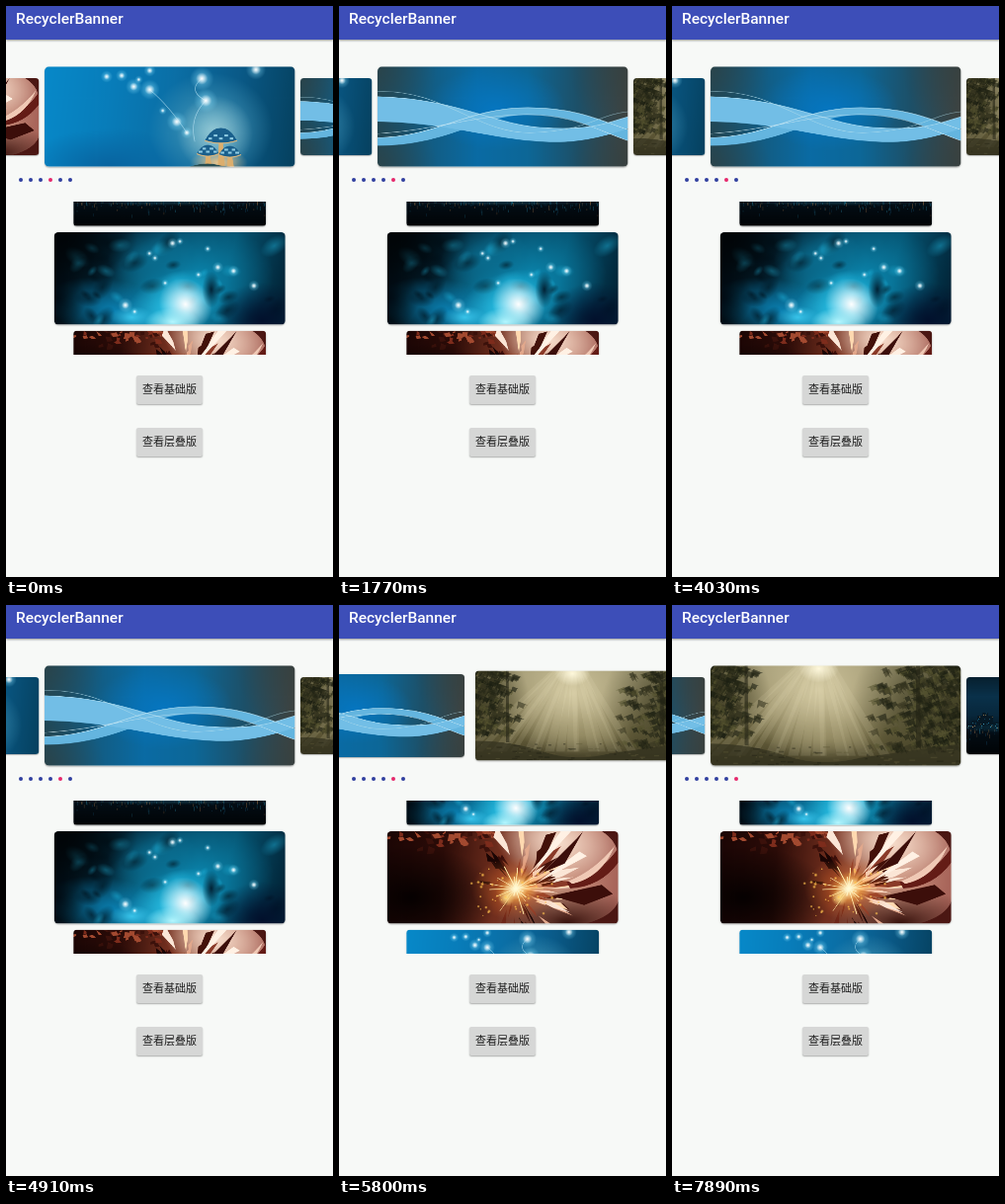
Recreate the animation shown at these times as an HTML page with a canvas. Size 331 px wide and 578 px high, loop 8000 ms.

```html
<!DOCTYPE html>
<html lang="zh">
<head>
<meta charset="utf-8">
<title>RecyclerBanner</title>
<style>
  html, body { margin: 0; width: 100%; height: 100%; overflow: hidden; background: #f7f9f7; }
  #stage { position: absolute; left: 0; top: 0; width: 331px; height: 578px; overflow: hidden; }
  header {
    position: absolute; left: 0; top: 0; width: 331px; height: 34px; background: #3d4eb8;
    box-shadow: 0 1px 2px rgba(0, 0, 0, .4);
    font: 500 15.5px/26px Roboto, sans-serif; color: #fff; text-indent: 10px;
  }
  .carousel { position: absolute; left: 0; width: 331px; overflow: hidden; }
  #across { top: 55px; height: 114px; }
  #down { top: 197.5px; height: 155px; }
  .card {
    position: absolute; left: 0; top: 0; width: 194.6px; height: 78px;
    border-radius: 3.5px; box-shadow: 0 .7px 1.2px rgba(0, 0, 0, .35);
  }
  .dot { position: absolute; top: 174.2px; width: 4px; height: 4px; border-radius: 50%; }
  .button {
    position: absolute; left: 132px; width: 67px; height: 29px; background: #d6d7d6;
    border-radius: 2px; box-shadow: 0 1px 1.5px rgba(0, 0, 0, .3);
    font: 11px/26px "Noto Sans CJK SC", "Noto Sans CJK", sans-serif; color: #1d1d1d;
    text-align: center; white-space: nowrap;
  }
</style>
</head>
<body>
<div id="stage">
  <div id="across" class="carousel"></div>
  <div id="down" class="carousel"></div>
  <header>RecyclerBanner</header>
  <div class="button" style="top:373.5px">查看基础版</div>
  <div class="button" style="top:426.5px">查看层叠版</div>
</div>
<script>
const LOOP = 8000, CARD_W = 194.6, CARD_H = 78, COUNT = 6;
const stage = document.getElementById('stage');

function seeded(seed) {
  return (lo = 0, hi = 1) => {
    seed = (seed * 16807) % 2147483647;
    return lo + (hi - lo) * seed / 2147483647;
  };
}

// Painting helpers; every picture is 250 x 100 units.
function linear(g, x1, y1, x2, y2, colors) {
  const fill = g.createLinearGradient(x1, y1, x2, y2);
  colors.forEach((c, i) => fill.addColorStop(i / (colors.length - 1), c));
  g.fillStyle = fill;
  g.fillRect(0, 0, 250, 100);
}

function glow(g, x, y, r, color, squash = 1, tilt = 0) {
  g.save();
  g.translate(x, y);
  g.rotate(tilt);
  g.scale(1, squash);
  const fill = g.createRadialGradient(0, 0, 0, 0, 0, r);
  fill.addColorStop(0, color);
  fill.addColorStop(1, color.slice(0, 7) + '00');
  g.fillStyle = fill;
  g.fillRect(-r, -r, 2 * r, 2 * r);
  g.restore();
}

function star(g, x, y, r) {
  glow(g, x, y, r * 2, '#8fe4ff99');
  glow(g, x, y, r, '#ffffff');
}

function shape(g, path, color) {
  g.fillStyle = color;
  g.fill(new Path2D(path));
}

function stroke(g, path, color, width) {
  g.strokeStyle = color;
  g.lineWidth = width;
  g.stroke(new Path2D(path));
}

function city(g) {
  const rnd = seeded(41);
  linear(g, 0, 0, 0, 100, ['#07202f', '#0a314a', '#08273b', '#030c13', '#010406']);
  for (let x = 0; x < 250; x += 7) {
    const h = rnd(3, 20);
    g.fillStyle = '#061824';
    g.fillRect(x, 66 - h, 7, h);
    for (let i = 0; i < 6; i++) {
      g.fillStyle = ['#46b4d4', '#c09a60', '#1f7fa8'][i % 3];
      g.fillRect(x + rnd(0, 6), 66 - rnd(0, h), 1, 1);
    }
  }
  glow(g, 125, 66, 130, '#2d9bbc66', .06);
  for (let i = 0; i < 150; i++) {
    g.fillStyle = ['#2b87a455', '#b4814e55', '#164e7055'][i % 3];
    g.fillRect(rnd(0, 250), 67 + 24 * rnd() * rnd(), 1, rnd(1, 6));
  }
}

function nebula(g) {
  const rnd = seeded(17);
  linear(g, 0, 0, 250, 60, ['#01060a', '#03202f', '#07506e', '#065573', '#022538']);
  glow(g, 140, 62, 100, '#0c93bd', .65, -.3);
  glow(g, 65, 85, 75, '#0a7fb0', .45, .2);
  glow(g, 108, 30, 50, '#0a6c8e', .7);
  for (let i = 0; i < 44; i++) {
    glow(g, rnd(25, 240), rnd(5, 98), rnd(6, 17), i % 2 ? '#01131e99' : '#1fb4dc77', .6, rnd(-1, 1));
  }
  glow(g, 10, 5, 80, '#010508', .7);
  glow(g, 0, 70, 35, '#010a12', 1);
  glow(g, 130, 80, 58, '#2cc6ea', .62, -.4);
  glow(g, 142, 78, 30, '#ffffff', .9, .7);
  glow(g, 128, 97, 30, '#b4f7ff', .5);
  glow(g, 84, 92, 24, '#39c4ea', .5);
  glow(g, 170, 62, 10, '#022235', 2);
  glow(g, 225, 96, 52, '#02102c', .8);
  [[128, 12, 3], [136, 10, 2], [103, 23, 2], [109, 28, 2], [77, 79, 4], [177, 38, 3],
   [194, 42, 3], [216, 58, 3], [166, 18, 2], [87, 86, 2], [156, 46, 2], [120, 55, 2]]
    .forEach(s => star(g, ...s));
}

function explosion(g) {
  const rnd = seeded(29), cx = 139, cy = 62;
  linear(g, 0, 0, 250, 20, ['#1c0605', '#2c0c08', '#74301f', '#d09a84', '#a8655a']);
  glow(g, 185, 12, 70, '#f6dccb', .6, .2);
  glow(g, 195, 100, 80, '#350f0a', .5);
  for (let i = 0; i < 40; i++) {
    const size = rnd(3, 9);
    shape(g, `M${rnd(0, 115)} ${30 * rnd() * rnd()}l${size} ${rnd(-3, 3)} ${rnd(-2, 5)} ${size * .7} ${-size} 1Z`,
      ['#7d2c1c', '#3b110b', '#a34a30'][i % 3]);
  }
  const dark = ['#3a0e09', '#1a0504', '#6d2618'], light = ['#fbe6d6', '#e2a88c', '#431109', '#ffd9b0', '#8a3a28'];
  for (let i = 0; i < 70; i++) {
    const a = rnd(-1, 1) * rnd(.4, 3.1) - .4, near = rnd(5, 45), far = near + rnd(10, 55), w = rnd(.02, .12);
    const at = (angle, d) => `${cx + Math.cos(angle) * d},${cy + Math.sin(angle) * d * .85}`;
    const tones = Math.cos(a + .4) > .1 ? light : dark;
    shape(g, `M${at(a + w, near)}L${at(a - w, far * rnd(.6, 1))}L${at(a, far)}L${at(a + w * .8, far * .7)}Z`, tones[i % tones.length]);
  }
  glow(g, 25, 72, 95, '#060101', .6);
  shape(g, 'M158 45L182 8 188 0H199ZM160 57L208 22 216 27Z', '#fff1e4');
  shape(g, 'M168 45L205 8 212 0 192 35ZM178 70L232 58 244 68 213 80Z', '#3c0e0a');
  shape(g, 'M194 55Q229 49 250 18V34Q231 60 198 62Z', '#641c16');
  shape(g, 'M196 54Q224 43 246 16Q232 50 200 57Z', '#f0c9b5');
  shape(g, 'M232 0Q248 10 250 26V0ZM215 100Q244 92 250 76V100Z', '#4b1713');
  glow(g, cx, cy, 48, '#e8702899', .72);
  glow(g, cx + 2, cy, 24, '#ffb84a', .8, -.4);
  for (let i = 0; i < 18; i++) {
    const a = i * 2.4, d = rnd(8, 30);
    stroke(g, `M${cx} ${cy}l${Math.cos(a) * d} ${Math.sin(a) * d}`, '#ffe6a5', rnd(.5, 1.4));
  }
  glow(g, cx, cy, 15, '#fffbd8', .8, -.5);
  glow(g, cx - 10, cy + 10, 9, '#ffe08a');
  for (let i = 0; i < 45; i++) glow(g, cx + rnd(-48, 40), cy + rnd(-22, 30), rnd(.8, 2.2), '#ffc14d');
}

function mushrooms(g) {
  linear(g, 0, 35, 250, 65, ['#0788c8', '#087dba', '#0b6fa6', '#0a5a88', '#064261']);
  glow(g, 65, 100, 85, '#0864a0', .45);
  glow(g, 166, 62, 62, '#4c9fbe', .9);
  glow(g, 170, 67, 38, '#a9d5dccc', 1);
  stroke(g, 'M105 23Q125 40 142 66M157 12Q142 24 161 34Q144 51 150 75', '#cff2ff88', .8);
  [[62, 10, 3], [77, 9, 3], [94, 13, 2], [89, 20, 4], [105, 4, 3], [105, 23, 5], [157, 12, 6],
   [161, 34, 6], [132, 55, 5], [142, 66, 3], [211, 3, 5], [118, 44, 2]].forEach(s => star(g, ...s));
  glow(g, 174, 96, 29, '#efc68a', .45);
  for (const [x, y, w] of [[176, 74, 16], [163, 87, 11], [185, 88, 11]]) {
    shape(g, `M${x - 2} ${y}L${x - 3} 100H${x + 4}L${x + 2} ${y}Z`, '#dcae6d');
    shape(g, `M${x - w} ${y}Q${x - w * .6} ${y - w * .8} ${x} ${y - w * .8}T${x + w} ${y}Q${x} ${y + 5} ${x - w} ${y}Z`, '#195f8c');
    for (let i = -2; i < 3; i++) {
      shape(g, `M${x + i * w / 3 - 1.8} ${y - 3 - (i % 2 ? 3 : 0)}h3.6v2h-3.6Z`, '#8fcce3');
    }
    stroke(g, `M${x - w} ${y}Q${x} ${y + 5} ${x + w} ${y}`, '#e0b97e', 1);
  }
  shape(g, 'M145 100Q160 95 172 98T204 100Z', '#264c50');
}

function waves(g) {
  linear(g, 0, 0, 250, 0, ['#1d4a5c', '#135c82', '#0a6ba4', '#0d6797', '#1d5068', '#404340']);
  glow(g, 118, 42, 70, '#0676c0', .6);
  for (const [x, y] of [[0, 0], [0, 100], [250, 0], [250, 100]]) glow(g, x, y, 60, '#34403f99');
  const lower = 'M0 71C60 70 90 41 150 41C200 41 225 55 250 63';
  const upper = 'M0 30C80 32 115 58 165 61S230 56 250 50';
  shape(g, lower + 'V74C220 64 195 47 150 48C100 49 70 79 0 79Z', '#64b5df');
  shape(g, upper + 'V62C220 72 195 77 165 75C110 72 70 56 0 55Z', '#72bee6');
  stroke(g, lower, '#c0e5f3', .6);
  stroke(g, upper, '#a9daf0', .6);
  stroke(g, 'M0 25C65 22 100 68 155 66S220 48 250 45', '#b5e0eeaa', .6);
  stroke(g, 'M0 67C60 63 95 49 145 48S220 64 250 74', '#d7eff6aa', .6);
}

function forest(g) {
  const rnd = seeded(73);
  linear(g, 0, 0, 0, 100, ['#a09873', '#948b65', '#807751', '#615a38', '#3f3b24']);
  glow(g, 108, 25, 85, '#cfc59d', .8);
  glow(g, 0, 30, 60, '#3a3820', 1);
  glow(g, 230, 40, 90, '#3d3c24', .9);
  for (let i = 0; i < 16; i++) {
    const x = -10 + i * 12 + rnd(-4, 4), w = rnd(5, 13);
    shape(g, `M106 -20L${x} 90H${x + w}L112 -20Z`, '#f0e8c41c');
  }
  // Foliage thickens towards both edges.
  const leaves = (edge, dir, reach, height, count) => {
    for (let i = 0; i < count; i++) {
      const y = rnd(-4, height), limit = reach * (.72 + .28 * Math.sin(y * .42));
      const x = edge + dir * limit * rnd() ** 1.3, w = rnd(4, 11);
      shape(g, `M${x} ${y}l${dir * w} ${w * .4} ${-dir * w * .3} 0 ${-dir * 2} 4 ${-dir * w * .4} -2 ${-dir * 3} 3Z`,
        ['#25261599', '#38372199', '#1d1f1299', '#55522f88'][i % 4]);
    }
  };
  leaves(-4, 1, 52, 68, 260);
  leaves(254, -1, 96, 82, 520);
  shape(g, 'M34 0h3l1 80h-4ZM205 0h4l1 82h-5Z', '#26261699');
  glow(g, 108, 3, 20, '#fff9dd', .7);
  glow(g, 118, 72, 60, '#b5aa7c55', .45);
  shape(g, 'M0 78Q40 78 75 90T150 92L250 78V100H0Z', '#33321ebb');
  for (let i = 0; i < 80; i++) {
    g.fillStyle = i % 2 ? '#5e593966' : '#1e201366';
    g.fillRect(rnd(0, 250), rnd(80, 100), rnd(1, 7), 1.5);
  }
}

const pictures = [city, nebula, explosion, mushrooms, waves, forest];

function addCards(id) {
  return pictures.map(paint => {
    const card = document.createElement('canvas');
    card.className = 'card';
    card.width = 500;
    card.height = 200;
    const g = card.getContext('2d');
    g.scale(2, 2);
    paint(g);
    document.getElementById(id).append(card);
    return card;
  });
}

const across = { cards: addCards('across'), x: 165.5, y: 57, gap: 229.8, size: CARD_W, grow: .3, dx: 1, dy: 0 };
const down = { cards: addCards('down'), x: 165.5, y: 77.7, gap: 92, size: CARD_H, grow: .2, dx: 0, dy: 1 };

const dots = pictures.map((_, i) => {
  const dot = document.createElement('div');
  dot.className = 'dot';
  dot.style.left = 13 + i * 10 + 'px';
  stage.append(dot);
  return dot;
});

function place(carousel, position) {
  const { cards, x, y, gap, size, grow, dx, dy } = carousel;
  cards.forEach((card, i) => {
    const turn = (i - position + 1.5 * COUNT) % COUNT - COUNT / 2;
    const offset = turn * gap;
    const scale = 1 + grow * Math.max(0, 1 - Math.abs(offset) / size);
    const left = x + offset * dx - CARD_W / 2, top = y + offset * dy - CARD_H / 2;
    card.style.transform = `translate(${left}px, ${top}px) scale(${scale})`;
  });
}

// Quintic ease-out slides: start time and duration in ms.
const SLIDES = { across: [[120, 930], [5632, 930]], down: [[4780, 880]] };
const DOT_DELAY = 300;

function progress(t, [start, duration]) {
  const p = Math.min(1, Math.max(0, (t - start) / duration));
  return 1 - (1 - p) ** 5;
}

const travelled = (t, slides) => slides.reduce((sum, s) => sum + progress(t, s), 0);

// The picture advances in steps of about 147 ms, restarting after a pause.
function stepped(t) {
  const base = t < 3590 ? 0 : 3590, step = 147.2;
  return base + Math.floor((t - base) / step) * step;
}

function render(time) {
  const t = stepped(time % LOOP);
  place(across, 3 + travelled(t, SLIDES.across));
  place(down, 1 + travelled(t, SLIDES.down));
  const active = 3 + SLIDES.across.filter(([start]) => t >= start + DOT_DELAY).length;
  dots.forEach((dot, i) => dot.style.background = i === active ? '#e5286b' : '#303f9f');
}

const began = performance.now();
function tick() {
  render(performance.now() - began);
  requestAnimationFrame(tick);
}
tick();
</script>
</body>
</html>
```
